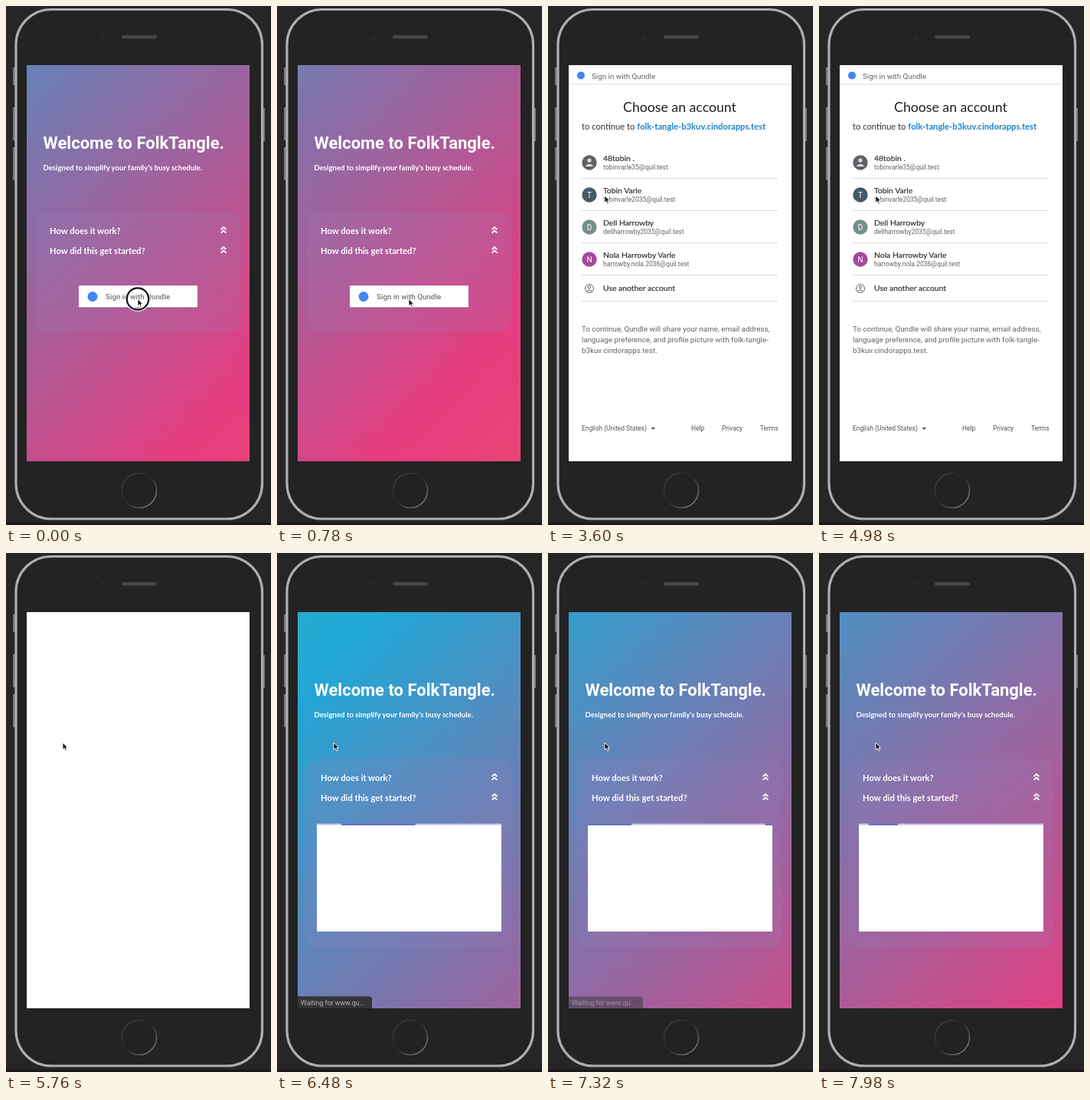
These frames come from a looping animation (346x676 px, 8 s). An HTML page:

```html
<!DOCTYPE html>
<html lang="en">
<head>
<meta charset="utf-8">
<title>Sign-in flow</title>
<style>
  html, body { margin: 0; width: 100%; height: 100%; overflow: hidden; background: #262626; }
  svg { display: block; width: 100%; height: 100%; }
  text { font-family: Roboto, sans-serif; fill: #5f6368; }
  .lato { font-family: Lato, sans-serif; }
  .light { fill: #fff; font-weight: 700; }
  .body { font-size: 9.8px; }
  .name { font-size: 10.4px; fill: #303134; stroke: #303134; stroke-width: .2px; }
  .mail { font-size: 8.5px; }
  .foot { font-size: 8.4px; fill: #505459; }
  .initial { font-size: 10px; fill: #fff; text-anchor: middle; }
  .rule { stroke: #dadce0; }
</style>
</head>
<body>
<svg viewBox="0 0 346 676" preserveAspectRatio="none">
  <defs>
    <linearGradient id="sky" gradientUnits="userSpaceOnUse" x1="-537.5" y1="-537.5" x2="1075" y2="1075">
      <stop offset="0" stop-color="#23d5ab"/>
      <stop offset=".3333" stop-color="#23a6d5"/>
      <stop offset=".6667" stop-color="#e73c7e"/>
      <stop offset="1" stop-color="#ee7752"/>
    </linearGradient>
    <linearGradient id="homeRim" x1="0" y1="0" x2="1" y2="1">
      <stop offset="0" stop-color="#4a4a4a"/>
      <stop offset=".45" stop-color="#242424"/>
      <stop offset="1" stop-color="#909090"/>
    </linearGradient>
    <clipPath id="screen"><rect x="27" y="77" width="291" height="516"/></clipPath>
    <path id="chevrons" d="M-3.4 -.8 0 -4 3.4 -.8M-3.4 3.7 0 .5 3.4 3.7" fill="none" stroke="#fff" stroke-width="1.8"/>
  </defs>

  <!-- phone -->
  <rect width="346" height="676" fill="#262626"/>
  <rect y="673" width="346" height="3" fill="#1d171b"/>
  <path d="M10.5 80v23M10.5 132v43M10.5 184v43M336.5 133v43" stroke="#777" stroke-width="3"/>
  <rect x="13" y="4.500" width="321.500" height="663.500" rx="46" fill="#232323" stroke="#aeaeae" stroke-width="3.2"/>
  <rect x="151" y="38" width="46" height="4.500" rx="2.200" fill="#464646"/>
  <circle cx="126" cy="41" r="2" fill="#111" stroke="#3c3c3c"/>
  <circle cx="174" cy="631" r="22.500" fill="#222" stroke="url(#homeRim)" stroke-width="1.500"/>

  <g clip-path="url(#screen)">
    <rect x="27" y="77" width="291" height="516" fill="#fff"/>

    <g id="welcome">
      <rect x="27" y="77" width="291" height="516" fill="url(#sky)"/>
      <text class="light" x="48.500" y="185.500" font-size="22">Welcome to FolkTangle.</text>
      <text class="lato light" x="48.500" y="214" font-size="9.6">Designed to simplify your family's busy schedule.</text>
      <rect id="card" x="38" y="268" width="268" height="157" rx="14" fill="#9682be" fill-opacity=".18"/>
      <text class="lato light" x="57" y="297" font-size="11.2">How does it work?</text>
      <text class="lato light" x="57" y="323" font-size="11.2">How did this get started?</text>
      <use href="#chevrons" x="284" y="292"/>
      <use href="#chevrons" x="284" y="318"/>
      <g id="button">
        <rect x="95" y="365" width="155" height="28.500" rx="2" fill="#000" opacity=".2"/>
        <rect x="95" y="364" width="155" height="28.500" rx="1.500" fill="#fff"/>
        <circle cx="113" cy="378.500" r="6.500" fill="#4285f4"/>
        <text x="130" y="382" class="body" font-weight="500" style="fill:#757575">Sign in with Qundle</text>
      </g>
      <g id="loader">
        <rect x="52" y="353" width="241" height="140" fill="#fff"/>
        <rect x="52" y="352.500" width="241" height="2" fill="#c9cbea"/>
        <rect id="barA" y="352.500" height="2" fill="#4f5db5"/>
        <rect id="barB" y="352.500" height="2" fill="#4f5db5"/>
      </g>
    </g>

    <g id="accounts">
      <circle cx="43" cy="90.500" r="5" fill="#4285f4"/>
      <text class="body" x="57" y="94.500">Sign in with Qundle</text>
      <path class="rule" d="M27 102H318"/>
      <text class="lato" x="172" y="138" font-size="17.7" text-anchor="middle" style="fill:#202124">Choose an account</text>
      <text class="lato" x="44" y="161" font-size="11.2" style="fill:#303134">to continue to <tspan font-weight="700" fill="#2083c9">folk-tangle-b3kuv.cindorapps.test</tspan></text>
      <g id="rows"></g>
      <g fill="none" stroke="#5f6368">
        <circle cx="54" cy="368" r="5.500"/>
        <circle cx="54" cy="366.300" r="1.700"/>
        <path d="M50.300 371.800Q54 368.500 57.700 371.800"/>
      </g>
      <text class="lato name" x="72" y="371">Use another account</text>
      <path class="rule" d="M44 384.500H300"/>
      <text class="body" x="44" y="424">To continue, Qundle will share your name, email address,</text>
      <text class="body" x="44" y="438">language preference, and profile picture with folk-tangle-</text>
      <text class="body" x="44" y="452">b3kuv.cindorapps.test.</text>
      <text class="foot" x="44" y="553">English (United States)</text>
      <path d="M134.500 549h5.500l-2.750 3z" fill="#505459"/>
      <text class="foot" x="187" y="553">Help</text>
      <text class="foot" x="227" y="553">Privacy</text>
      <text class="foot" x="277" y="553">Terms</text>
    </g>

    <g id="status">
      <path d="M27 577.500H120.500Q124 577.500 124 581V593H27Z" fill="#343537"/>
      <text x="31" y="588.500" font-size="8.8" style="fill:#b4b4b4">Waiting for www.qu...</text>
    </g>
  </g>

  <g id="cursor">
    <g id="ring" fill="none">
      <circle r="14.200" stroke="#fff" stroke-width="4.500" opacity=".8"/>
      <circle r="14.200" stroke="#111" stroke-width="2.200"/>
    </g>
    <path d="M0 0V9.300L2.200 7.300 3.700 10.700 5.300 10 3.900 6.700H6.700Z" fill="#111" stroke="#fff" stroke-width=".9"/>
  </g>
</svg>
<script>
const LOOP = 8000;
const $ = id => document.getElementById(id);
const clamp = v => Math.max(0, Math.min(1, v));
const ramp = (t, from, to) => clamp((t - from) / (to - from));
const show = (id, on) => { $(id).style.display = on ? '' : 'none'; };
const smooth = v => v * v * (3 - 2 * v);

const people = [
  ['48tobin .', 'tobinvarle35@quil.test', '#5f6368', ''],
  ['Tobin Varle', 'tobinvarle2035@quil.test', '#455a64', 'T'],
  ['Dell Harrowby', 'dellharrowby2035@quil.test', '#788e8e', 'D'],
  ['Nola Harrowby Varle', 'harrowby.nola.2036@quil.test', '#a5489c', 'N'],
];
$('rows').innerHTML = people.map(([name, mail, color, initial], i) => `
  <g transform="translate(0 ${i * 42})">
    <circle cx="54" cy="204" r="9.7" fill="${color}"/>
    ${initial ? `<text class="initial" x="54" y="207.6">${initial}</text>`
      : '<circle cx="54" cy="201" r="2.600" fill="#ddd"/><path d="M48.500 209Q54 202.500 59.500 209Z" fill="#ddd"/>'}
    <text class="lato name" x="72" y="202">${name}</text>
    <text class="mail" x="72" y="213">${mail}</text>
    <path class="rule" d="M44 224.500H300"/>
  </g>`).join('');

// CSS "ease" curve, solved for its parameter by bisection
function ease(x) {
  let lo = 0, hi = 1;
  for (let i = 0; i < 24; i++) {
    const u = (lo + hi) / 2, v = 1 - u;
    if (.75 * v * u + u ** 3 < x) lo = u; else hi = u;
  }
  const v = 1 - lo;
  return .3 * v * v * lo + 3 * v * lo * lo + lo ** 3;
}

function setBar(id, left, width) {
  $(id).setAttribute('x', 52 + 241 * left);
  $(id).setAttribute('width', 241 * width);
}

function drawLoader(t) {
  const phase = Math.max(0, t - 6004) / 1788 % 1;
  const grow = ramp(phase, 0, .5), leave = ramp(phase, .5, .75), last = ramp(phase, .75, 1);
  setBar('barA', .25 * grow + .75 * leave, .75 * grow * (1 - leave));
  setBar('barB', last, .25 * leave * (1 - last));
}

function draw(t) {
  const returned = t >= 5880;
  const loading = t >= 6000;
  show('welcome', t < 1980 || returned);
  show('accounts', t >= 2400 && t < 5520);
  show('button', !returned);
  show('loader', loading);
  $('card').setAttribute('height', loading ? 246 : returned ? 106 : 157);
  drawLoader(t);

  const age = returned ? t - 5300 : Math.min(t, 1200) + 3500;
  const shift = (404 - 870 * ease(clamp(age / 7500))) / 2;
  $('sky').setAttribute('gradientTransform', `translate(${shift} ${shift})`);

  $('status').style.opacity = t < 1980
    ? ramp(t, 1500, 1740)
    : ramp(t, 6000, 6180) * (1 - ramp(t, 7200, 7440));

  const move = smooth(ramp(t, 2700, 3420));
  $('cursor').setAttribute('transform', `translate(${172 - 98 * move} ${381.5 - 134.5 * move})`);
  $('ring').style.opacity = t < 2000 ? 1 - ramp(t, 240, 400)
    : t >= 3720 ? 1 - ramp(t, 3960, 4120) : 0;
}

const start = performance.now();
function tick() {
  draw((performance.now() - start) % LOOP);
  requestAnimationFrame(tick);
}
tick();
</script>
</body>
</html>
```
